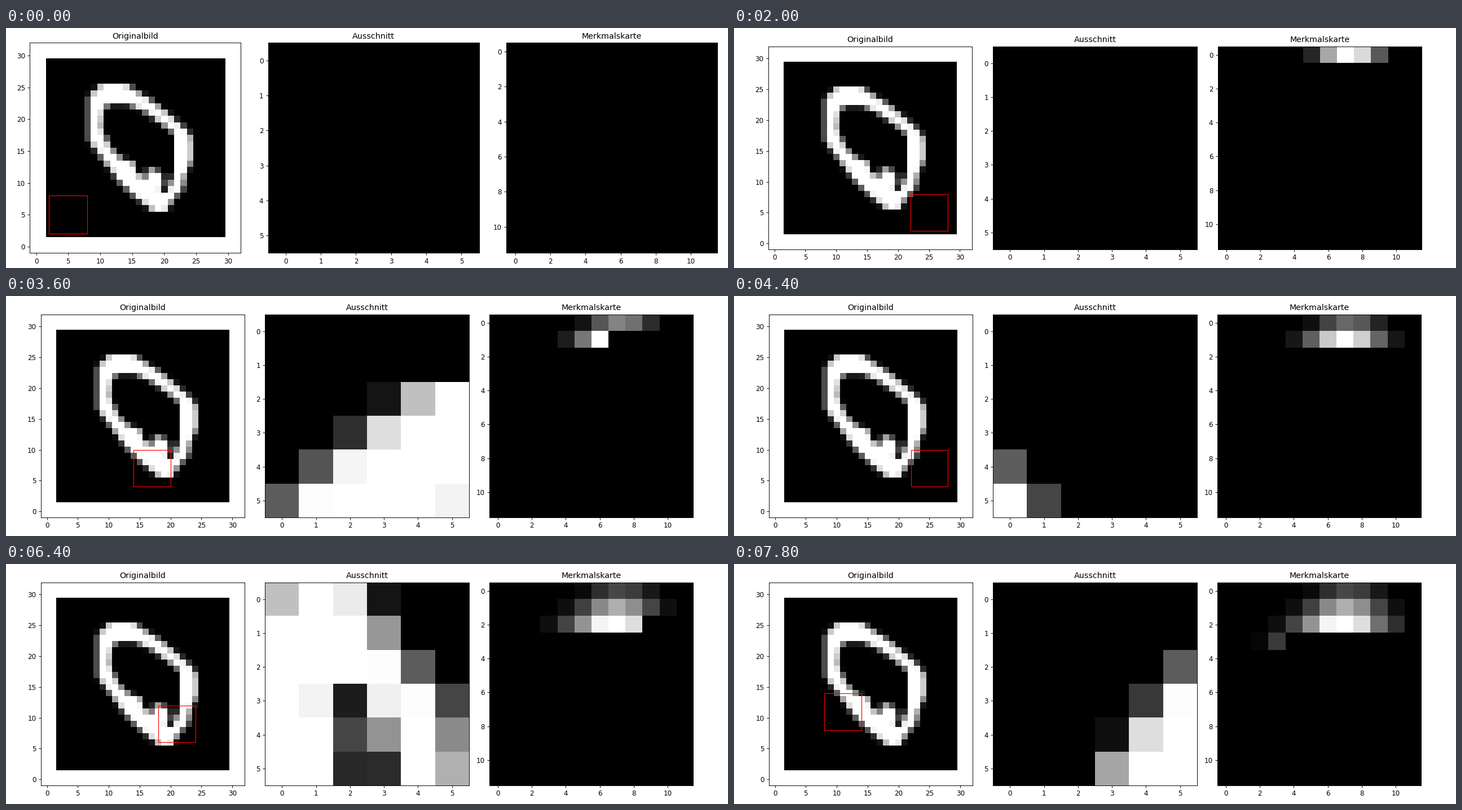
A matplotlib script for the animation above (8000 ms loop, 1280x427 px).

```python
import numpy as np
import matplotlib.pyplot as plt
from matplotlib.animation import FuncAnimation
from matplotlib.patches import Rectangle
from matplotlib.path import Path

W, H = 1280, 427
DPI = W / 15
FRAMES, INTERVAL = 40, 200
KERNEL, STRIDE, CELLS = 6, 2, 12
OFFSET, SIZE = 2, 28  # position and size of the picture in the left plot
PAD, LABEL, SIDE, BOTTOM = 12.8, 23.2, 361.6, 32.85  # layout in pixels

# Key points of the handwritten zero: outer contour and hole
OUTER = [(18.3, 5.5), (15.2, 8), (12.8, 10.3), (8.17, 16.7), (8.17, 23.5),
         (10.2, 25.5), (13.9, 25.5), (17.8, 23), (19.2, 22), (23.4, 18.4),
         (24.27, 17), (24.27, 13.5), (23.2, 11.2), (22.9, 9), (21.4, 7.5), (20.2, 5.5)]
HOLE = [(10.4, 21.4), (11.3, 22.35), (14.3, 22.35), (17, 21.1), (21, 18.2),
        (21.5, 17.4), (21.5, 11.4), (20.3, 8.5), (19.3, 8.7), (19.9, 10.3),
        (19.5, 11.5), (18.3, 12.2), (17.2, 12), (17.2, 10.6), (15.6, 11.5),
        (15.2, 13.3), (13.2, 13.8), (11.5, 15.6), (10.2, 18.5)]


def draw_digit(size=32, sub=10):
    """Share of each pixel that the ink covers."""
    axis = (np.arange(size * sub) + 0.5) / sub - 0.5
    points = np.stack(np.meshgrid(axis, axis), axis=-1).reshape(-1, 2)
    ink = Path(OUTER).contains_points(points) & ~Path(HOLE).contains_points(points)
    return ink.reshape(size, sub, size, sub).mean(axis=(1, 3))


def corner(k):
    row, col = divmod(k, CELLS)
    return OFFSET + STRIDE * col, OFFSET + STRIDE * row


def patch(k):
    x, y = corner(k)
    return digit[y:y + KERNEL, x:x + KERNEL]


def layout(n):
    """Left margin, cell width, gap and box side after n tightening passes."""
    left = gap = LABEL + PAD
    side = SIDE + 12.4
    cell = (W - left - PAD - 2 * gap) / 3
    for _ in range(n):
        slack = cell - side
        left = PAD + max(LABEL - slack / 2, 0)
        gap = LABEL + PAD - slack
        cell = (W - left - PAD - 2 * gap) / 3
        side = SIDE
    return left, cell, gap, side


def show(art, data):
    art.set_data(data)
    art.set_clim(0, data.max() or 1)


digit = draw_digit()
sums = np.array([patch(k).sum() for k in range(FRAMES)])

fig = plt.figure(figsize=((W + 0.01) / DPI, (H + 0.01) / DPI), dpi=DPI, facecolor="white")
axes = [fig.add_axes([0.1 + 0.3 * i, 0.1, 0.2, 0.8]) for i in range(3)]
left_ax, cut_ax, map_ax = axes

style = dict(cmap="gray", interpolation="nearest", aspect="auto", vmin=0, vmax=1)
end = OFFSET + SIZE
left_ax.imshow(digit[OFFSET:end, OFFSET:end], origin="lower",
               extent=(OFFSET - 0.5, end - 0.5) * 2, **style)
left_ax.set(xlim=(-1, 32), ylim=(-1, 32))
cut_art = cut_ax.imshow(np.zeros((KERNEL, KERNEL)), **style)
map_art = map_ax.imshow(np.zeros((CELLS, CELLS)), **style)
window = left_ax.add_patch(Rectangle((2, 2), KERNEL, KERNEL, fill=False, ec="red", lw=1))

for ax, title, ticks in zip(axes, ("Originalbild", "Ausschnitt", "Merkmalskarte"),
                            (range(0, 31, 5), range(6), range(0, 11, 2))):
    ax.set_title(title, fontsize=12)
    ax.set_xticks(ticks)
    ax.set_yticks(ticks)


def update(n):
    left, cell, gap, side = layout(n)
    bottom = BOTTOM - (side - SIDE) / 2
    for i, ax in enumerate(axes):
        x = left + i * (cell + gap) + (cell - side) / 2
        ax.set_position([x / W, bottom / H, side / W, side / H])

    window.set_xy(corner(n))
    show(cut_art, patch(n))
    features = np.zeros(CELLS * CELLS)
    features[:n + 1] = sums[:n + 1]
    show(map_art, features.reshape(CELLS, CELLS))
    return []


anim = FuncAnimation(fig, update, frames=FRAMES, interval=INTERVAL,
                     repeat=True, repeat_delay=0, blit=False)
plt.show()
```
